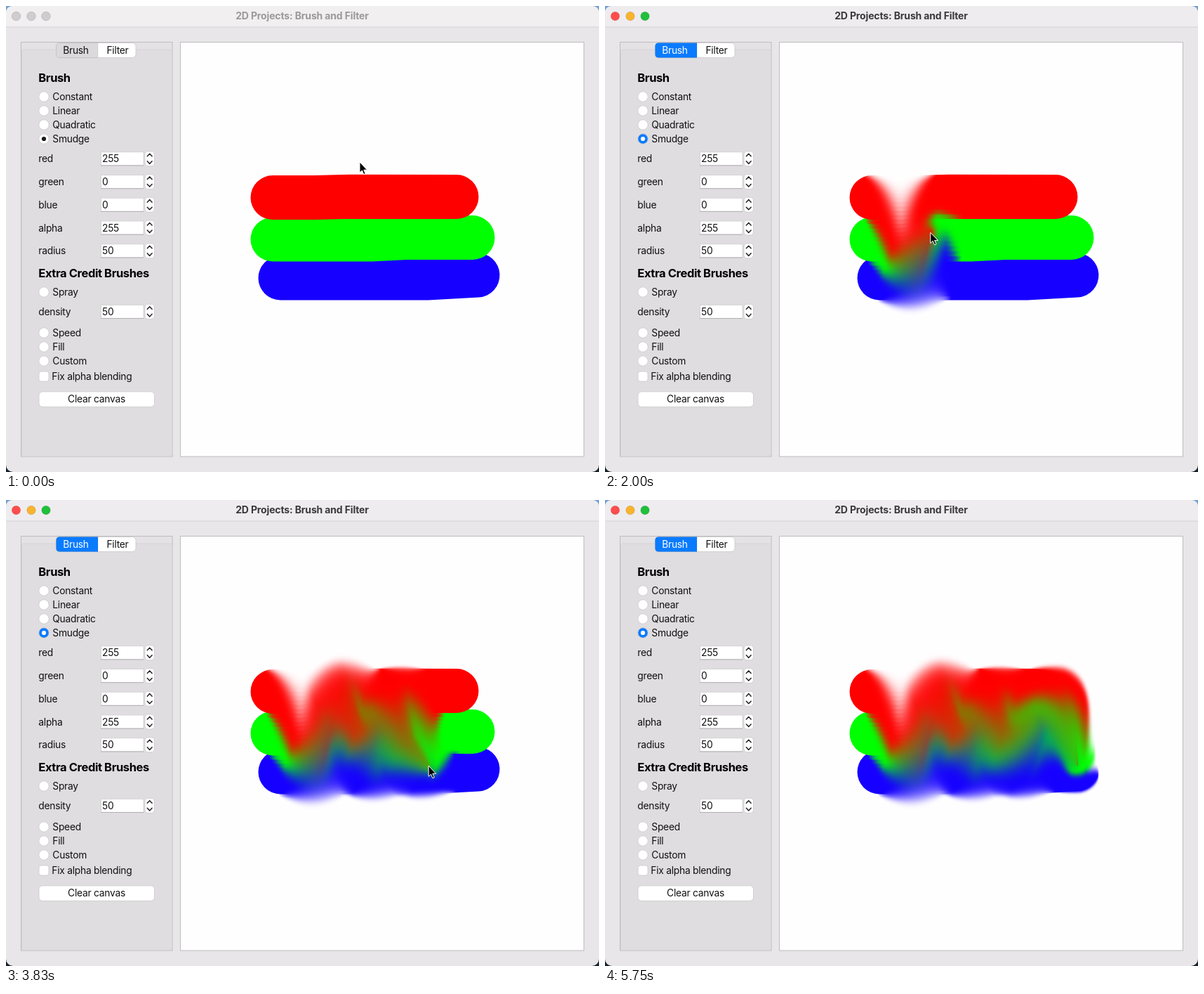
An HTML page with a canvas for the animation above (5830 ms loop, 845 by 663 pixels).

```html
<!DOCTYPE html>
<html>
<head>
<meta charset="utf-8">
<style>
html, body { margin: 0; width: 100%; height: 100%; overflow: hidden; }
body {
  position: relative; background: linear-gradient(#6fa0d4 50%, #17222c 50%);
  --dot1: #cfcdcf; --dot2: #cfcdcf; --dot3: #cfcdcf; --rim: #b9b7b9;
  --bar: #f1eff0; --title: #9b999b;
  --tab: #dbd9db; --tabText: #111; --radio: #fff; --mark: #1a1a1a;
}
body.active {
  --dot1: #fe4d4b; --dot2: #f9b42d; --dot3: #1fc03a; --rim: #0002;
  --bar: #eeecee; --title: #3b393b;
  --tab: #0a7bff; --tabText: #fff; --radio: #0a7bff; --mark: #fff;
}
svg, canvas { position: absolute; left: 0; top: 0; }
text { font: 13.8px Inter, "Open Sans", sans-serif; letter-spacing: -.25px; fill: #111; }
.head { font-weight: 700; font-size: 16.5px; letter-spacing: -.4px; fill: #000; }
.title { font-weight: 700; font-size: 14px; letter-spacing: -.15px; fill: var(--title); }
.mid { text-anchor: middle; }
.box { fill: #fff; stroke: #cbc9cb; stroke-width: .8; }
</style>
</head>
<body>
<svg id="ui" width="845" height="663"></svg>
<canvas id="paint" width="400" height="290" style="left:340px;top:180px"></canvas>
<svg width="845" height="663">
  <path id="cursor" d="M0 0V15.2L3.4 12 5.8 17.6 8.2 16.6 5.8 11.2H10.6Z" fill="#000" stroke="#fff" stroke-width="1"/>
</svg>
<script>
const $ = id => document.getElementById(id);

// Window and controls
const label = (x, y, s, cls = '') => `<text x="${x}" y="${y}" class="${cls}">${s}</text>`;
const rect = (x, y, w, h, r, attrs) =>
  `<rect x="${x}" y="${y}" width="${w}" height="${h}" rx="${r}" ${attrs}/>`;
const radio = (y, s, on) =>
  `<circle cx="54" cy="${y}" r="7.2" class="box" ${on ? 'style="fill:var(--radio)"' : ''}/>` +
  (on ? `<circle cx="54" cy="${y}" r="3.1" fill="var(--mark)"/>` : '') +
  label(66.3, y + 5, s);
const spin = (y, name, value) =>
  label(46.3, y + 5, name) +
  rect(135.5, y - 9.5, 60.5, 19, 0, 'fill="#fff" stroke="#cfcdcf" stroke-width=".8"') +
  `<path d="M135 ${y + 9.7}h61" stroke="#aaa8aa" stroke-width=".8"/>` +
  label(137, y + 5, value) +
  rect(198, y - 10.5, 13.5, 21, 4.5, 'class="box"') +
  `<path d="M201.3 ${y - 3.5}l3.4-3.6 3.4 3.6M201.3 ${y + 3.5}l3.4 3.6 3.4-3.6"
    fill="none" stroke="#222" stroke-width="1.5" stroke-linecap="round" stroke-linejoin="round"/>`;

$('ui').innerHTML =
  rect(0, 0, 845, 663, 10, 'fill="#e8e6e8"') +
  '<path d="M0 30V10Q0 0 10 0H835Q845 0 845 10V30Z" fill="var(--bar)"/>' +
  '<path d="M0 30H845" stroke="#d3d1d3"/>' +
  [14.5, 36, 57].map((x, i) =>
    `<circle cx="${x}" cy="14.5" r="6.2" fill="var(--dot${i + 1})" stroke="var(--rim)" stroke-width=".8"/>`).join('') +
  label(422, 19, '2D Projects: Brush and Filter', 'title mid') +
  rect(21.5, 51.5, 215.5, 589.5, 0, 'fill="#e4e2e4" stroke="#bebcbe"') +
  rect(22.5, 62, 214, 578.5, 3, 'fill="#dfdddf" stroke="#d5d3d5"') +
  rect(248.5, 51.5, 575, 589.5, 0, 'fill="#fffeff" stroke="#bebcbe"') +
  rect(71.5, 52.5, 113.5, 21, 5, 'class="box"') +
  '<path d="M131 52.5H76.5q-5 0-5 5v11q0 5 5 5H131Z" fill="var(--tab)" stroke="#0002" stroke-width=".6"/>' +
  '<text x="99.5" y="68" class="mid" style="fill:var(--tabText)">Brush</text>' +
  label(159, 68, 'Filter', 'mid') +
  label(46.3, 108, 'Brush', 'head') +
  label(46.3, 386, 'Extra Credit Brushes', 'head') +
  radio(129, 'Constant') + radio(149, 'Linear') + radio(169, 'Quadratic') + radio(189, 'Smudge', true) +
  spin(217.3, 'red', 255) + spin(250, 'green', 0) + spin(282.7, 'blue', 0) +
  spin(315.5, 'alpha', 255) + spin(348.3, 'radius', 50) +
  radio(407, 'Spray') + spin(434.8, 'density', 50) +
  radio(465, 'Speed') + radio(485, 'Fill') + radio(505, 'Custom') +
  rect(47, 520, 14, 14, 3, 'class="box"') + label(65.3, 532, 'Fix alpha blending') +
  rect(47, 548.8, 164.5, 21.5, 5, 'class="box"') + label(129, 564, 'Clear canvas', 'mid');

// Pointer path: time, x, y
const keys = [
  [0, 504, 222], [170, 496, 224], [580, 424, 238], [1080, 421, 246], [1250, 421, 246],
  [1330, 420, 259], [1580, 424, 350], [1780, 441, 404], [1980, 462, 330], [2200, 479, 253],
  [2580, 512, 338], [2820, 526, 396], [3080, 546, 340], [3250, 560, 287], [3350, 566, 279],
  [3550, 580, 340], [3740, 594, 390], [3960, 614, 345], [4250, 643, 274], [4330, 647, 273],
  [4560, 661, 279], [4780, 672, 320], [5080, 673, 374], [5200, 674, 376], [5320, 674, 376],
  [5330, 674, 376], [5670, 860, 385], [5840, 860, 385]
];
const slope = (i, c) => {
  const a = keys[Math.max(i - 1, 0)], b = keys[Math.min(i + 1, keys.length - 1)];
  return (b[c] - a[c]) / (b[0] - a[0]);
};
function pointer(t) {
  const i = keys.findIndex((k, n) => t < keys[n + 1][0]);
  const a = keys[i], b = keys[i + 1], d = b[0] - a[0], u = (t - a[0]) / d, v = 1 - u;
  return [1, 2].map(c =>
    a[c] * (1 + 2 * u) * v * v + b[c] * (3 - 2 * u) * u * u +
    d * u * v * (slope(i, c) * v - slope(i + 1, c) * u));
}

// Smudge simulation
const W = 400, H = 290, LEFT = 340, TOP = 180, R = 52, SIZE = 2 * R + 1;
const PRESS = 1250, RELEASE = 5100, STEP = 1000 / 60;
const ctx = $('paint').getContext('2d', { willReadFrequently: true });
ctx.fillStyle = '#fffeff';
ctx.fillRect(0, 0, W, H);
ctx.translate(-LEFT, -TOP);
ctx.lineWidth = 63;
ctx.lineCap = ctx.lineJoin = 'round';
for (const [color, ...points] of [
  ['#1600ff', 391, 387, 600, 387, 672, 383],
  ['#00ff00', 380, 332, 520, 332, 570, 329.5, 665, 329.5],
  ['#ff0000', 380, 272.5, 440, 272.5, 490, 271.3, 642, 271.5]
]) {
  ctx.strokeStyle = color;
  ctx.beginPath();
  for (let i = 0; i < points.length; i += 2) ctx.lineTo(points[i], points[i + 1]);
  ctx.stroke();
}
const image = ctx.getImageData(0, 0, W, H);
const start = Float32Array.from(image.data);
const pixels = start.slice();
const held = new Float32Array(SIZE * SIZE * 4);
let dabs = 0;

function eachPixel(n, visit) {
  const [px, py] = pointer(PRESS + n * STEP);
  const cx = Math.round(px) - LEFT, cy = Math.round(py) - TOP;
  for (let y = -R; y <= R; y++)
    for (let x = -R; x <= R; x++) {
      const mask = 1 - Math.hypot(x, y) / R;
      if (mask > 0) visit(((cy + y) * W + cx + x) * 4, ((y + R) * SIZE + x + R) * 4, mask);
    }
}
function dab(n) {
  eachPixel(n - 1, (p, h) => { for (let c = 0; c < 3; c++) held[h + c] = pixels[p + c]; });
  eachPixel(n, (p, h, m) => {
    for (let c = 0; c < 3; c++) pixels[p + c] += m * (held[h + c] - pixels[p + c]);
  });
}
function paint(t) {
  const goal = Math.max(0, Math.floor((Math.min(t, RELEASE) - PRESS) / STEP + 1e-6));
  if (goal < dabs) { pixels.set(start); dabs = 0; }
  while (dabs < goal) dab(++dabs);
  image.data.set(pixels);
  ctx.putImageData(image, 0, 0);
}

// Twelve pictures a second
const LOOP = 5830, FPS = 12;
let shown = -1;
function draw(now) {
  const k = Math.min(69, Math.floor((now % LOOP + 3.4) * FPS / 1000));
  if (k !== shown) {
    shown = k;
    const t = k * 1000 / FPS, [x, y] = pointer(t);
    document.body.classList.toggle('active', t > 1080);
    paint(t);
    $('cursor').setAttribute('transform', `translate(${x} ${y})`);
  }
  requestAnimationFrame(() => draw(performance.now() - origin));
}
const origin = performance.now();
draw(0);
</script>
</body>
</html>
```
